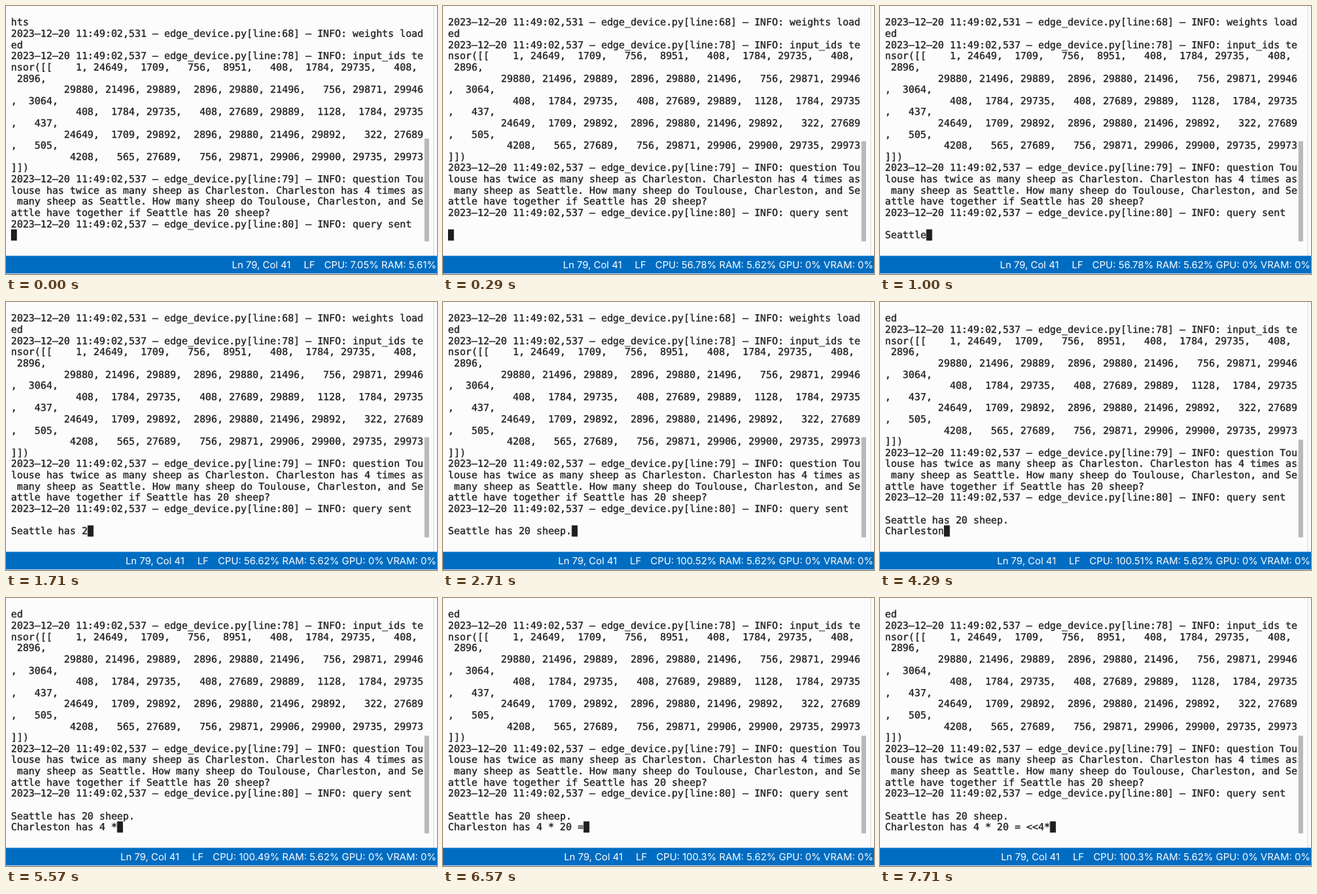
Animation, 600 px wide and 374 px high, one loop 8 s. Source, as an HTML page with a canvas:

```html
<!DOCTYPE html>
<html lang="en">
<head>
<meta charset="utf-8">
<title>Terminal stream</title>
<style>
  html, body { margin: 0; width: 100%; height: 100%; overflow: hidden; background: #fdfcfd; }
  canvas { display: block; }
</style>
</head>
<body>
<canvas id="stage" width="600" height="374"></canvas>
<script>
const ctx = document.getElementById('stage').getContext('2d');
ctx.textRendering = 'geometricPrecision';

const LOOP = 8000, FPS = 7;
const COLS = 70, ROWS = 20;
const CELL = 8.2, PITCH = 15.62, LEFT = 7, LAST_BASELINE = 324.2;
const PAPER = '#fdfcfd';

const info = (ms, line, message) =>
  `2023-12-20 11:49:02,${ms} - edge_device.py[line:${line}] - INFO: ${message}\n`;

const tensor = `tensor([[    1, 24649,  1709,   756,  8951,   408,  1784, 29735,   408,  2896,
         29880, 21496, 29889,  2896, 29880, 21496,   756, 29871, 29946,  3064,
           408,  1784, 29735,   408, 27689, 29889,  1128,  1784, 29735,   437,
         24649,  1709, 29892,  2896, 29880, 21496, 29892,   322, 27689,   505,
          4208,   565, 27689,   756, 29871, 29906, 29900, 29735, 29973]])`;

const log = 'hts\n' +
  info(531, 68, 'weights loaded') +
  info(537, 78, 'input_ids ' + tensor) +
  info(537, 79, 'question Toulouse has twice as many sheep as Charleston. ' +
    'Charleston has 4 times as many sheep as Seattle. How many sheep do Toulouse, ' +
    'Charleston, and Seattle have together if Seattle has 20 sheep?') +
  info(537, 80, 'query sent');

const chunks = '\n|Seattle| has |2|0| sheep.|\n|Charl|eston| has |4| *| 2|0 =| <<|4*'.split('|');

// Chunks arrive at a pace that slows slightly as the answer grows.
const arrival = k => Math.round(2.4 + 3.03 * k + 0.024 * k * k);

// CPU load, refreshed once a second.
const loads = '7.05 56.78 56.62 100.52 100.51 100.51 100.49 100.3 100.3'.split(' ');

function wrap(text) {
  return text.split('\n').flatMap(line => {
    const parts = [];
    do {
      parts.push(line.slice(0, COLS));
      line = line.slice(COLS);
    } while (line);
    return parts;
  });
}

function drawTerminal(tick) {
  const answer = chunks.filter((_, k) => arrival(k) <= tick).join('');
  const lines = wrap(log + answer);
  const visible = lines.slice(-ROWS);

  ctx.font = '13.62px "DejaVu Sans Mono", monospace';
  ctx.fillStyle = ctx.strokeStyle = '#1c1c1c';
  ctx.lineWidth = 0.3;
  visible.forEach((line, row) => {
    const y = LAST_BASELINE - (ROWS - 1 - row) * PITCH;
    // Wide dashes suit the terminal face better than its short hyphen.
    [...line.replaceAll('-', '–')].forEach((char, col) => {
      if (char === ' ') return;
      ctx.fillText(char, LEFT + col * CELL, y);
      ctx.strokeText(char, LEFT + col * CELL, y);
    });
  });

  ctx.fillStyle = '#1e1e1e';
  ctx.fillRect(LEFT + visible[ROWS - 1].length * CELL, 311.7, CELL, 15.7);

  const top = 185 + (lines.length - ROWS) * 3.6;
  ctx.fillStyle = '#b9b9b9';
  ctx.fillRect(582.5, top, 6.5, 328.5 - top);
  ctx.fillStyle = '#dcdcdc';
  ctx.fillRect(595, 0, 1, 349);
}

function drawStatus(tick) {
  ctx.fillStyle = '#006dc2';
  ctx.fillRect(0, 348.6, 600, 24.7);

  const second = Math.floor((tick + 5) / FPS);
  const usage = second
    ? `CPU: ${loads[second]}% RAM: 5.62% GPU: 0% VRAM: 0%`
    : `CPU: ${loads[0]}% RAM: 5.61%`;
  ctx.font = '13.55px Inter, sans-serif';
  ctx.fillStyle = '#fff';
  const x = 599 - ctx.measureText(usage).width;
  ctx.fillText(usage, x, 366);
  ctx.fillText('LF', x - 28.5, 366);
  ctx.fillText('Ln 79, Col 41', x - 128.5, 366);
}

function frame() {
  const t = performance.now() % LOOP;
  const tick = Math.floor(t * FPS / 1000 + 0.05);
  ctx.fillStyle = PAPER;
  ctx.fillRect(0, 0, 600, 374);
  drawTerminal(tick);
  drawStatus(tick);
  requestAnimationFrame(frame);
}
frame();
</script>
</body>
</html>
```
